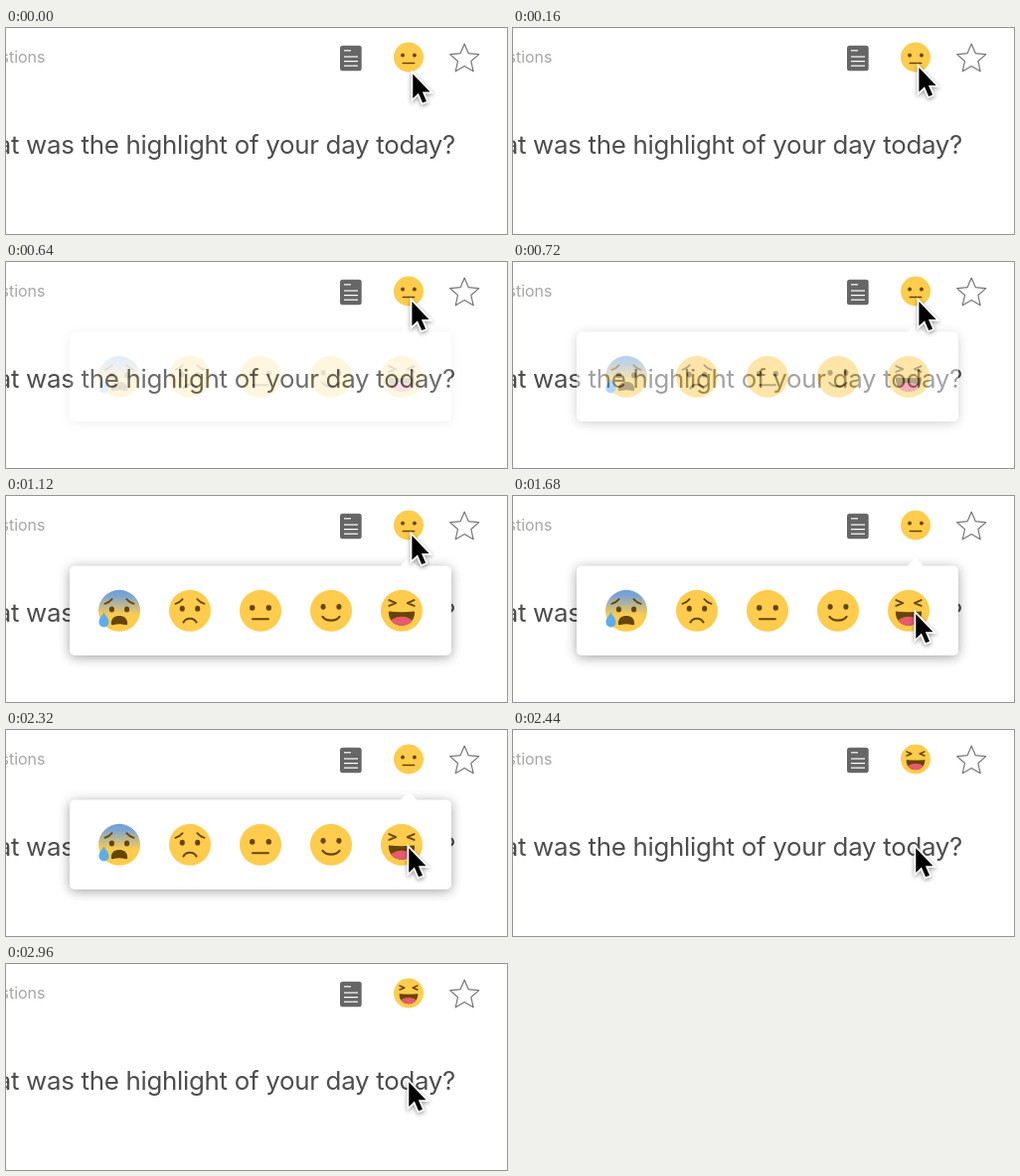
Write an HTML page with a canvas that moves like this. It is 504 px wide and 208 px high and loops after 3.56 s.

```html
<!DOCTYPE html>
<html lang="en">
<head>
<meta charset="utf-8">
<title>Mood picker</title>
<style>
html, body { margin: 0; width: 100%; height: 100%; overflow: hidden; background: #fff; }
canvas { display: block; width: 504px; height: 208px; }
</style>
</head>
<body>
<canvas id="stage"></canvas>
<script>
const W = 504, H = 208, LOOP = 3560, STEP = 40;
const YELLOW = '#ffcc4d', BROWN = '#664500';
const dpr = window.devicePixelRatio || 1;

function setup(canvas) {
  canvas.width = W * dpr;
  canvas.height = H * dpr;
  const c = canvas.getContext('2d');
  c.scale(dpr, dpr);
  return c;
}

const clamp = v => Math.min(1, Math.max(0, v));
const span = (t, a, b) => clamp((t - a) / (b - a));
const easeOut = (p, n) => 1 - Math.pow(1 - p, n);
const mix = (a, b, p) => a + (b - a) * p;

// CSS-like "ease" curve, solved by bisection
function ease(x) {
  const bez = (a, b, s) => 3 * a * s * (1 - s) ** 2 + 3 * b * s * s * (1 - s) + s ** 3;
  let lo = 0, hi = 1;
  for (let i = 0; i < 20; i++) {
    const mid = (lo + hi) / 2;
    if (bez(0.25, 0.25, mid) < x) lo = mid; else hi = mid;
  }
  return bez(0.1, 1, lo);
}

function fillPath(c, d, color) {
  c.fillStyle = color;
  c.fill(new Path2D(d));
}

function strokePath(c, d, width) {
  c.strokeStyle = BROWN;
  c.lineWidth = width;
  c.lineCap = c.lineJoin = 'round';
  c.stroke(new Path2D(d));
}

function oval(c, x, y, rx, ry, color) {
  c.fillStyle = color;
  c.beginPath();
  c.ellipse(x, y, rx, ry, 0, 0, Math.PI * 2);
  c.fill();
}

function eyes(c, dx, y, rx, ry) {
  for (const s of [-1, 1]) oval(c, 18 + s * dx, y, rx, ry, BROWN);
}

function brows(c) {
  strokePath(c, 'M5.5 12Q9 11.3 11.7 8M30.5 12Q27 11.3 24.3 8', 1.5);
}

// Features are drawn on a 36-unit square
const features = {
  anxious(c) {
    brows(c);
    eyes(c, 6.5, 16.8, 2.2, 2.5);
    fillPath(c, 'M11 29C11 24.5 14 22.5 18 22.5S25 24.5 25 29Q25 31 22.8 30.2Q18 28.8 13.2 30.2Q11 31 11 29Z', BROWN);
    fillPath(c, 'M4.6 19.2C6 22 9 24.5 9 28A4.3 4.3 0 0 1 .4 28C.4 24.5 3.4 22 4.6 19.2Z', '#5dadec');
  },
  worried(c) {
    brows(c);
    eyes(c, 6.6, 16.2, 2.2, 2.5);
    strokePath(c, 'M12.4 28Q14.2 24.8 18 24.8T23.6 28', 1.8);
  },
  neutral(c) {
    eyes(c, 7.1, 15.5, 2.3, 2.4);
    strokePath(c, 'M11.2 25.2H24.8', 1.8);
  },
  smile(c) {
    eyes(c, 6.8, 14.6, 2.2, 2.5);
    strokePath(c, 'M10.7 23.2C12.4 25.5 14.8 26.4 18 26.4S23.6 25.5 25.3 23.2', 1.9);
  },
  laugh(c) {
    strokePath(c, 'M7.2 8.8L13 11.4L7.2 13.8M28.8 8.8L23 11.4L28.8 13.8', 1.7);
    const mouth = 'M6.8 18.6Q18 19.8 29.2 18.6C29.6 25.6 25 30.8 18 30.8S6.4 25.6 6.8 18.6Z';
    fillPath(c, mouth, BROWN);
    c.save();
    c.clip(new Path2D(mouth));
    oval(c, 18, 29.6, 10.5, 6.6, '#e75a70');
    c.restore();
  }
};

function face(c, kind, x, y, r) {
  c.save();
  c.translate(x - r, y - r);
  c.scale(r / 18, r / 18);
  let skin = YELLOW;
  if (kind === 'anxious') {
    skin = c.createLinearGradient(0, 0, 0, 36);
    skin.addColorStop(0, '#6a9fe0');
    skin.addColorStop(0.15, '#7fa5cf');
    skin.addColorStop(0.62, YELLOW);
  }
  oval(c, 18, 18, 18, 18, skin);
  features[kind](c);
  c.restore();
}

function text(c, str, right, base, size, spacing, color) {
  c.font = `400 ${size}px Inter, sans-serif`;
  c.letterSpacing = spacing + 'px';
  c.textAlign = 'right';
  c.fillStyle = color;
  c.fillText(str, right, base);
}

function note(c) {
  c.fillStyle = '#666';
  c.beginPath();
  c.roundRect(336, 17.7, 21.7, 25.6, 2.5);
  c.fill();
  c.fillStyle = '#fff';
  c.fillRect(340, 22.2, 7, 1.2);
  for (const y of [28.4, 33, 37.6]) c.fillRect(340, y, 14, 1.2);
}

function star(c, x, y, r) {
  c.beginPath();
  for (let i = 0; i < 10; i++) {
    const a = i * Math.PI / 5, d = i % 2 ? r * 0.46 : r;
    c.lineTo(x + d * Math.sin(a), y - d * Math.cos(a));
  }
  c.closePath();
  c.strokeStyle = '#777';
  c.lineWidth = 1.2;
  c.lineJoin = 'round';
  c.stroke();
}

function pointer(c, x, y) {
  const arrow = new Path2D('M0 0V24.6L5.6 19.3L9.8 29L13.7 27.4L9.6 18H17.2Z');
  c.save();
  c.translate(x, y);
  c.lineJoin = 'miter';
  c.lineWidth = 3.6;
  c.strokeStyle = '#fff';
  c.shadowColor = 'rgba(0,0,0,.4)';
  c.shadowBlur = 4 * dpr;
  c.shadowOffsetY = 1.5 * dpr;
  c.stroke(arrow);
  c.shadowColor = 'transparent';
  c.fillStyle = '#000';
  c.fill(arrow);
  c.restore();
}

function makePopup() {
  const canvas = document.createElement('canvas');
  const c = setup(canvas);
  const card = new Path2D();
  card.roundRect(64, 70.5, 384, 90.5, 5);
  c.fillStyle = '#fff';
  c.save();
  c.shadowColor = 'rgba(0,0,0,.36)';
  c.shadowBlur = 12 * dpr;
  c.shadowOffsetY = 2 * dpr;
  c.fill(card);
  c.restore();
  fillPath(c, 'M396.5 71L405 62L413.5 71Z', '#fff');
  Object.keys(features).forEach((kind, i) => face(c, kind, 114 + 71 * i, 115.8, 21));
  return canvas;
}

const ctx = setup(document.getElementById('stage'));
const popup = makePopup();

function pointerAt(t) {
  const up = easeOut(span(t, 0, 160), 2);
  const down = span(t, 1160, 1680);
  if (down > 0) return [mix(408.4, 405.3, down), mix(40, 119.3, easeOut(down, 2.2))];
  return [mix(409.3, 408.4, up), mix(46.5, 40, up)];
}

function draw(t) {
  ctx.fillStyle = '#fff';
  ctx.fillRect(0, 0, W, H);
  text(ctx, 'Questions', 39.5, 35, 16, 0, '#a6a6a6');
  text(ctx, 'What was the highlight of your day today?', 452, 127, 25.9, -0.3, '#4d4d4d');
  note(ctx);
  face(ctx, t < 2360 ? 'neutral' : 'laugh', 405, 29.5, 15);
  star(ctx, 461.2, 31.4, 15.3);

  const shown = t < 2320 ? ease(span(t, 560, 1120)) : 1 - span(t, 2320, 2440);
  if (t >= 640 && shown > 0) {
    ctx.globalAlpha = shown;
    ctx.drawImage(popup, 0, 0, W, H);
    ctx.globalAlpha = 1;
  }
  pointer(ctx, ...pointerAt(t));
}

const start = performance.now();
function tick() {
  const t = (performance.now() - start) % LOOP;
  draw(Math.floor(t / STEP) * STEP);
  requestAnimationFrame(tick);
}
tick();
</script>
</body>
</html>
```
